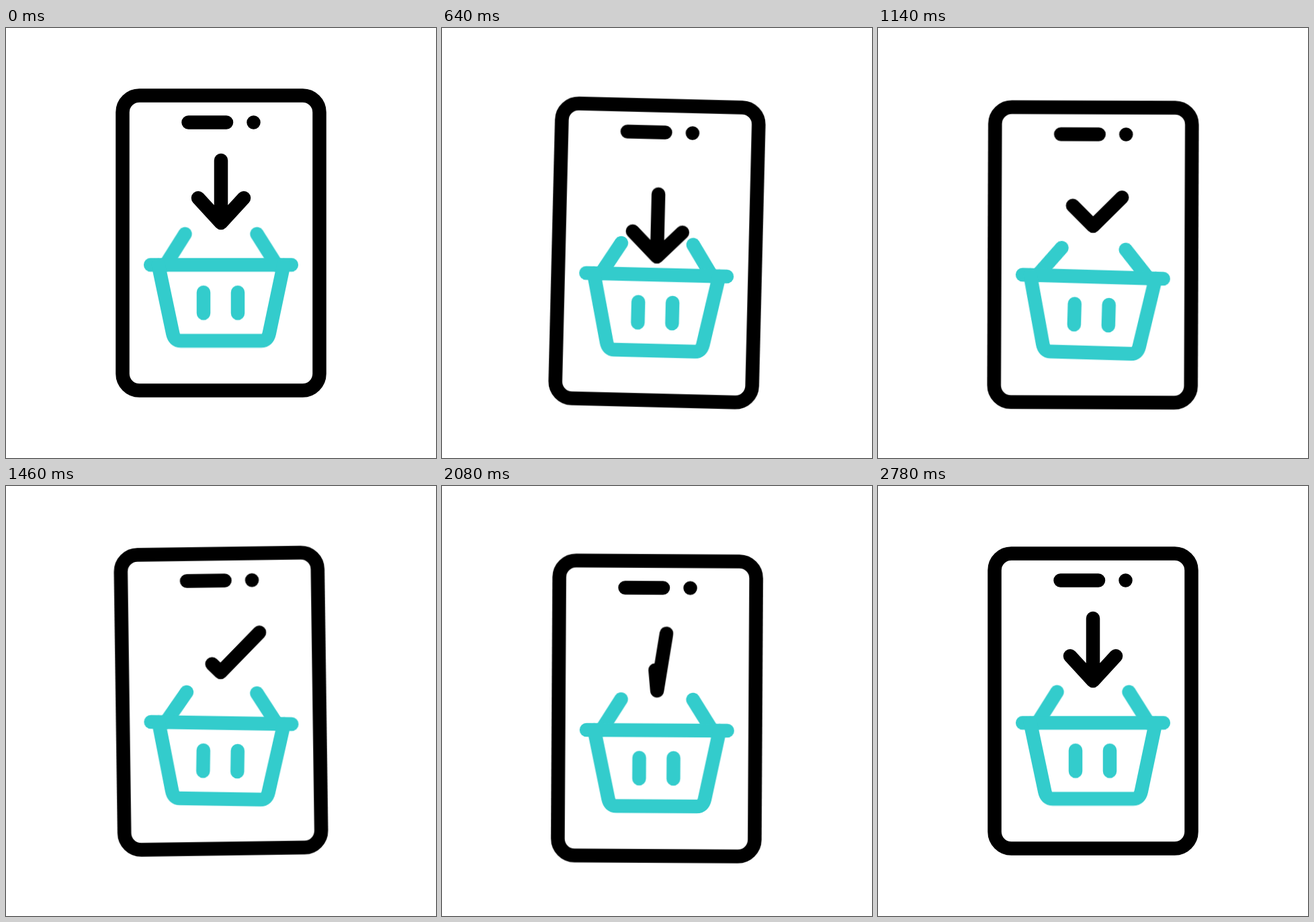
An HTML page that plays this animation: 640x640 px, repeating every 3000 ms.

```html
<!DOCTYPE html>
<html lang="en">
<head>
<meta charset="utf-8">
<title>Add to basket</title>
<style>
  html, body { margin: 0; width: 100%; height: 100%; overflow: hidden; background: #fff; }
  svg { display: block; width: 100%; height: 100%; }

  .line { fill: none; stroke: #000; stroke-width: 20.5; stroke-linecap: round; stroke-linejoin: round; }
  .teal { stroke: #33cccc; }

  .phone, .basket, .handle, .drop, .arrow { animation: 3s ease-in-out infinite; }
  .phone { animation-name: sway; }
  .basket { animation-name: tilt; }
  .handle { animation-name: fold; }
  .drop { animation-name: drop; }
  .arrow { animation-name: morph; }

  @keyframes sway {
    0%, 4% { transform: translateY(0) rotate(0deg); }
    16.667% { transform: translateY(35px) rotate(3.5deg); }
    29% { transform: translateY(-32px) rotate(-3.4deg); }
    41.667% { transform: translateY(28px) rotate(.97deg); }
    54.667% { transform: translateY(-20.6px) rotate(-2.1deg); }
    67.333% { transform: translateY(12.3px) rotate(.4deg); }
    80% { transform: translateY(-10.3px) rotate(-.85deg); }
    92.667%, 100% { transform: translateY(0) rotate(0deg); }
  }

  @keyframes tilt {
    0%, 29% { transform: rotate(0deg); }
    41.667% { transform: rotate(1.7deg); }
    54.667% { transform: rotate(1.65deg); }
    67.333%, 100% { transform: rotate(0deg); }
  }

  @keyframes fold {
    0%, 29% { transform: rotate(0deg); }
    41.667% { transform: rotate(9.2deg); }
    54.667% { transform: rotate(-4.2deg); }
    67.333%, 100% { transform: rotate(0deg); }
  }

  /* Position of the arrow tip; it re-enters as a V while hidden by the basket. */
  @keyframes drop {
    0%, 4% { transform: translateY(-30px); }
    15.333% { transform: translateY(-34.3px); animation-timing-function: ease-in; }
    27.333% { transform: translateY(91px); animation-timing-function: linear; }
    29.333% { transform: translateY(125px); animation-timing-function: step-end; }
    29.34% { transform: translateY(85px); animation-timing-function: ease-out; }
    37.333%, 61.667% { transform: translateY(-43px); }
    76.667% { transform: translateY(-11.5px); }
    89.333%, 100% { transform: translateY(-30px); }
  }

  /* Arrow, V, check mark, shaft, arrow. */
  @keyframes morph {
    0%, 4% { d: path("M-34 -37L0 0L34 -37M0 0L0 -93"); }
    14%, 29.333% { d: path("M-37 -37L0 0L37 -37M0 0L0 -93"); }
    29.34%, 33.333% { d: path("M-37 -37L0 0L37 -37M0 0L0 0"); }
    46.333%, 60% { d: path("M-12.5 -12.5L0 0L58.5 -58.5M0 0L0 0"); }
    60.01% { d: path("M-12.5 -12.5L0 0L0 0M0 0L58.5 -58.5"); }
    74% { d: path("M0 -36L0 0L0 -36M0 0L0 -93"); }
    89.333%, 100% { d: path("M-34 -37L0 0L34 -37M0 0L0 -93"); }
  }
</style>
</head>
<body>
<svg viewBox="-320 -320 640 640">
  <clipPath id="above"><rect x="-320" y="-320" width="640" height="352"/></clipPath>

  <g class="phone line">
    <rect x="-146.5" y="-219.5" width="293" height="439" rx="25"/>
    <path d="M-48.5 -179.5H8M48.5 -179.5h.01"/>

    <g clip-path="url(#above)">
      <g class="drop"><path class="arrow" d="M-34 -37L0 0L34 -37M0 0L0 -93"/></g>
    </g>

    <g transform="translate(0 32.5)">
      <g class="basket teal">
        <g transform="translate(-82.5 0)"><path class="handle" d="M0 0L29 -46"/></g>
        <g transform="translate(82.5 0) scale(-1 1)"><path class="handle" d="M0 0L29 -46"/></g>
        <path d="M-104.8 0H104.8"/>
        <path d="M-93.3 0L-71.8 102Q-69.5 113 -60 113H60Q69.5 113 71.8 102L93.3 0"/>
        <path d="M-26 41V72M25 41V72"/>
      </g>
    </g>
  </g>
</svg>
</body>
</html>
```
